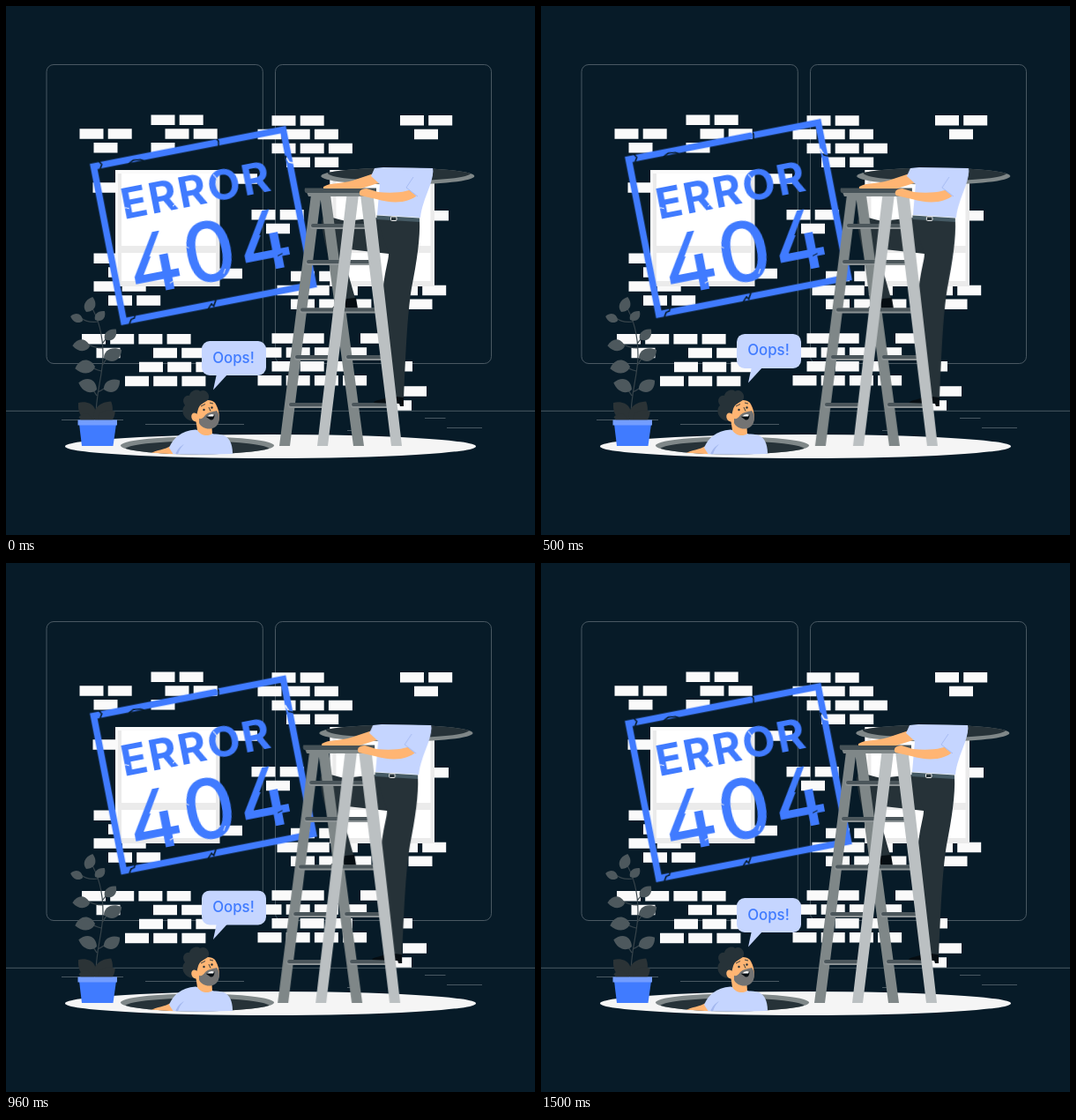
An HTML page without scripts for the animation above (1.54 s loop, 600 by 600 pixels).

```html
<!DOCTYPE html>
<html lang="en">
<head>
<meta charset="utf-8">
<title>Error 404</title>
<style>
  html, body { margin: 0; width: 100%; height: 100%; overflow: hidden; background: #071b28; }
  svg { display: block; width: 100vw; height: 100vh; }
  text { font-family: Inter, sans-serif; fill: #407bff; }

  .blue { fill: #407bff; }
  .shirt { fill: #c5d5ff; }
  .skin { fill: #ffb573; }
  .dark { fill: #263238; }
  .black { fill: #060d12; }
  .steel { fill: #7f8788; }
  .light { fill: #bbc0c2; }
  .line { fill: none; stroke: #66737b; stroke-width: .7; }
  .bricks { fill: none; stroke: #fafafa; stroke-width: 11.5; stroke-dasharray: 27 5.2; }

  /* 1.5 s of motion, then a short rest */
  .float, .shake, .beat { animation: float 1.54s linear infinite; }
  .shake { animation-name: shake; animation-timing-function: ease; }
  .beat { animation-name: beat; animation-timing-function: ease; transform-origin: 1px 3px; }

  @keyframes float {
    0%, 97.4%, 100% { transform: translateY(0); }
    48.7% { transform: translateY(-12px); }
  }
  @keyframes shake {
    0%, 97.4%, 100% { transform: translateX(0); }
    9.74%, 87.66% { transform: translateX(-1.2px); }
    19.48%, 77.92% { transform: translateX(2.4px); }
    29.22%, 48.7%, 68.18% { transform: translateX(-4.8px); }
    38.96%, 58.44% { transform: translateX(4.8px); }
  }
  @keyframes beat {
    0%, 29.22%, 38.96%, 58.44%, 100% { transform: scale(1); }
    9.74%, 48.7% { transform: scale(1.085); }
  }
</style>
</head>
<body>
<svg viewBox="0 0 600 600">
  <defs>
    <path id="leaf" d="M0 0C2-9 13-13 24-5C20 8 8 11 0 0Z"/>
    <g id="window">
      <path fill="#ebebeb" d="M0 0h118.500v132h-118.500z"/>
      <path fill="#fafafa" d="M0 0h3v132h-3zM3 0h112v4h-112z"/>
      <path fill="#fff" d="M7 4h107v82h-107zM7 94h107v32h-107z"/>
    </g>
    <mask id="worn" maskUnits="userSpaceOnUse" x="-130" y="-110" width="260" height="220">
      <path fill="#fff" d="M-130-110h260v220h-260z"/>
      <path d="M-48-8L-67 23H-36V-8ZM79-8L60 23H91V-8Z"/>
      <g fill="none" stroke="#000" stroke-width="1.600">
        <path d="M-103-95l3 5-3 5M-70-85l6-3 8 1 4 2M32-95l3 4-1 6M-13 94l5-5 2 3 4-7M-104 94l3-5 4-1 2-4M106-60l3 8 5 2"/>
        <path stroke-width="1" d="M-84-37l5 2M-30-28l6-4M22-55l3 6M64-50l6 2M-50 57l5-2M-26 18l5 4M12 58l3-5M76 50l6-2"/>
      </g>
    </mask>
    <clipPath id="hole"><path d="M120 420H310V498.500A87 10 0 0 1 130 498.500H120Z"/></clipPath>
    <clipPath id="lower"><ellipse cx="217" cy="498.500" rx="87" ry="10"/></clipPath>
    <clipPath id="upper"><ellipse cx="444.300" cy="193" rx="87" ry="9.500"/></clipPath>
  </defs>

  <!-- wall -->
  <g class="line">
    <rect x="46" y="66.500" width="245.300" height="339" rx="8"/>
    <rect x="305.500" y="66.500" width="245" height="339" rx="8"/>
    <path d="M0 459.300H600M63 469.500H133M158 474.500H270M387 481.500H398M475 467.500H498.500M500 478.500H540"/>
  </g>
  <path class="bricks" d="M164.500 129.300h59.200M83.500 145h59.200M180.500 145h59.200M99.500 160.800h27M164.500 160.800h27
    M258 196h27M98.500 206h27M278.500 236.800h59.200M295 252.500h27M99.500 286.300h27M116 302h27M241 303.500h27
    M99.500 318h59.200M116 334h59.200M86 377.800h123.600M102.500 393.500h27M167 393.500h59.200M151 409.500h91.400M135 425.500h91.400"/>
  <path class="bricks" d="M301.500 130h59.200M447 129.800h59.200M285.500 145.500h91.400M463 145.500h27M301.500 161.500h91.400M318 177.300h59.200
    M475 237.800h27M323 306.500h59.200M307.500 322.500h91.400M440 322.500h59.200M323 338.300h91.400M456.500 338.300h27
    M301.500 377h59.200M402 377h27M285.500 393h123.600M301.500 408.800h91.400M434 408.800h27M285.500 424.700h123.600M450 437h27M433 453h27"/>
  <use href="#window" x="124" y="186"/>
  <use href="#window" x="367.500" y="186"/>

  <!-- floor -->
  <ellipse cx="300" cy="499.500" rx="233" ry="13.500" fill="#f5f5f5"/>
  <ellipse class="steel" cx="217" cy="498.500" rx="87" ry="10"/>
  <ellipse class="dark" cx="217" cy="503" rx="82" ry="9.500" clip-path="url(#lower)"/>

  <!-- plant -->
  <path fill="none" stroke="#37444b" stroke-width="1.200" d="M102 470C101 440 110 420 110 396S105 354 95 338M103 442Q98 434 94 430M104 438Q112 434 116 430M108 414Q99 412 92 406M109 408Q114 399 119 395M110 388Q99 388 88 381M110 382Q114 376 119 371M105 358Q92 360 84 353M103 354L107 350"/>
  <g fill="#4d585d">
    <use href="#leaf" transform="translate(91 347) rotate(-55) scale(.75)"/>
    <use href="#leaf" transform="translate(87 357) rotate(-148) scale(.6)"/>
    <use href="#leaf" transform="translate(101 356) rotate(-30) scale(.6)"/>
    <use href="#leaf" transform="translate(95 386) rotate(-166) scale(.8)"/>
    <use href="#leaf" transform="translate(112 378) rotate(-30) scale(.7)"/>
    <use href="#leaf" transform="translate(101 409) rotate(-174) scale(.93)"/>
    <use href="#leaf" transform="translate(111 399) rotate(-12) scale(.9)"/>
    <use href="#leaf" transform="translate(103 435) rotate(-148) scale(.9)"/>
    <use href="#leaf" transform="translate(111 435) rotate(-18) scale(.85)"/>
  </g>
  <g fill="#2b3336">
    <use href="#leaf" transform="translate(100 470) rotate(-120) scale(1.100)"/>
    <use href="#leaf" transform="translate(98 470) rotate(-155) scale(.65)"/>
    <use href="#leaf" transform="translate(101 470) rotate(-38) scale(1.150)"/>
    <use href="#leaf" transform="translate(104 470) rotate(-15) scale(.9)"/>
  </g>
  <path class="blue" d="M83 474H125L121.500 499H86Z"/>
  <path fill="#739dff" d="M81.500 469.500H126V475.500H81.500Z"/>

  <!-- man in the hole -->
  <g clip-path="url(#hole)">
    <path class="skin" d="M163 508C170 503 180 504 188 498L197 502 191 510Z"/>
    <path class="shirt" d="M185 501C190 490 198 482 215 480.500L236 485.500C249 485 258 490 257 512H192Z"/>
    <path fill="#a4b8ef" d="M192 509C194 503 198 499 202 497Q196 503 195 509Z"/>
  </g>
  <path class="skin" d="M214 462L232 458 234 485C229 489 220 487 217 481Z"/>
  <path class="skin" d="M215 455C220 446 232 445 237 450C241 456 243 465 241 471C237 480 225 480 219 473Z"/>
  <path class="dark" d="M208 470C199 466 199 456 203 453C198 446 204 441 208 442C209 436 217 434 220 437C226 433 233 441 229 447C225 450 220 451 218 457L215 468C213 471 210 471 208 470Z"/>
  <ellipse class="skin" cx="214.500" cy="466.500" rx="4" ry="5.200" transform="rotate(-25 214.500 466.500)"/>
  <path fill="#737373" d="M219 468Q223 469 226 464C229 461 235 460 239 459C243 464 243 473 238 477C231 482 222 479 219 473Z"/>
  <path class="black" d="M227 466Q232 462 236.500 463.500Q236.500 470 232 469.500Z"/>
  <path fill="#fff" d="M228 465.500Q232 462 236 463.500L235 465.500Z"/>
  <g class="dark"><circle cx="224.500" cy="458" r="1.200"/><circle cx="233.500" cy="455.500" r="1.200"/></g>
  <path fill="none" stroke="#263238" stroke-width=".900" d="M221 454L226 451.500M231 450L235 451M230 455L232 459.500"/>

  <!-- stamp -->
  <g class="float">
    <g transform="translate(224 249) rotate(-11)">
      <rect x="-109.500" y="-89.500" width="219" height="179" fill="none" stroke="#407bff" stroke-width="7.500" mask="url(#worn)"/>
    </g>
  </g>
  <g transform="translate(224 249) rotate(-11)">
    <g class="beat"><g mask="url(#worn)">
      <text x="-87" y="-24" font-size="48.500" font-weight="700" letter-spacing="2.200">ERROR</text>
      <text x="-93 -29.500 34" y="63.500" font-size="93" font-weight="500">404</text>
    </g></g>
  </g>

  <!-- ladder and climber -->
  <g class="shake">
    <ellipse class="steel" cx="444.300" cy="193" rx="87" ry="9.500"/>
    <ellipse class="dark" cx="446" cy="189.500" rx="81" ry="9" clip-path="url(#upper)"/>
    <path class="dark" d="M422 240L465 243 434 281 380 275 397 335 385 337C373 308 361 275 358 246C358 238 365 238 385 244Z"/>
    <path class="black" d="M386 332L397 331 399 343H370Q371 339 380 338Z"/>
    <path class="steel" d="M346 214H357.500L322 499H310ZM356 214H368L406 499H394Z"/>
    <g fill="none" stroke-linecap="round">
      <path stroke="#8b9294" stroke-width="6" d="M348 250H408M343 291H413M336 345.500H424M330 399H370M388 399H428M323 453H360M394 453H434"/>
      <path stroke="#4b565b" stroke-width="4" d="M348 249H408M343 290H413M336 344.500H424M330 398H370M388 398H428M323 452H360M394 452H434"/>
    </g>
    <path class="dark" d="M421 241L469 243C470 262 466 290 460 320C455 350 453 400 451 447L431 446C433 400 431 360 427 330C429 300 434 290 434 281Z"/>
    <path class="black" d="M434 442L451 444V454H447L446 451 417 450C418 446 428 448 434 442Z"/>
    <path class="light" d="M386.500 214H400L365 499H353ZM402 214H416.500L449 499H437Z"/>
    <path class="steel" d="M341 211H417L415 216H343Z"/>
    <path fill="#465257" d="M339 206.500H420V212H340Q338 210 339 206.500Z"/>

    <path class="skin" d="M420 189L393 198C380 202 368 200 360 205V207H403L425 200Z"/>
    <path class="shirt" d="M418 184L428 183 484 184C486 200 473 216 470 240L421 237 424 202 414 193Z"/>
    <path class="skin" d="M466 204C460 211 440 213 422 211L409 207C402 207 399 211 402 215L420 219C440 225 458 223 467 214Z"/>
    <path class="shirt" d="M463 186L484 184C486 194 478 206 467 217L454 206Z"/>
    <path fill="none" stroke="#9fb4ef" stroke-width=".800" d="M462 194Q458 200 454 206L467 216"/>
    <path fill="#455a64" d="M420.500 237.500L469 240.500V245L420.500 242Z"/>
    <rect x="436.500" y="239" width="6.500" height="4.500" rx="1" fill="#263238" stroke="#f0f0f0"/>
  </g>

  <!-- speech bubble -->
  <g class="float">
    <rect class="shirt" x="222" y="380" width="73" height="39" rx="9"/>
    <path class="shirt" d="M239 417H252L235 435.500Z"/>
    <text x="258" y="404.500" font-size="16.800" font-weight="500" text-anchor="middle">Oops!</text>
  </g>
</svg>
</body>
</html>
```
